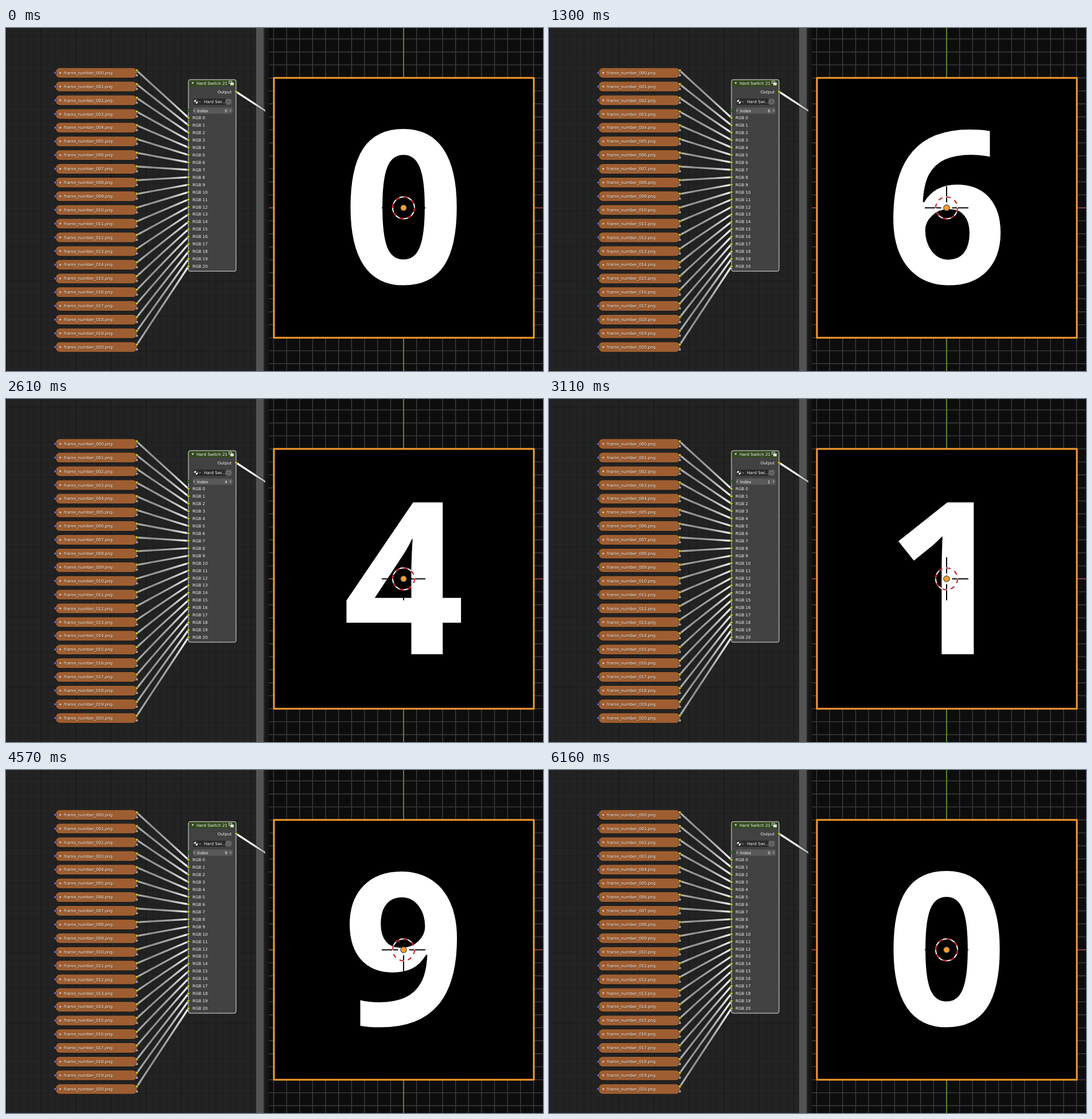
Recreate the animation shown at these times as an HTML page. Size 936 px wide and 598 px high, loop 6.56 s.

```html
<!DOCTYPE html>
<html lang="en">
<head>
<meta charset="utf-8">
<title>Hard Switch</title>
<style>
  html, body { margin: 0; width: 100%; height: 100%; overflow: hidden; background: #0d0d0d; }
  svg { display: block; width: 936px; height: 598px; }
  text { font: 7.1px "DejaVu Sans", sans-serif; fill: #f0f0f0; }
  .end { text-anchor: end; }
  #digit { font: 700 371px "Open Sans", "Noto Sans", sans-serif; fill: #fff; text-anchor: middle; }
</style>
</head>
<body>
<svg viewBox="0 0 936 598">
  <defs>
    <linearGradient id="wire" gradientUnits="userSpaceOnUse" x1="228" y1="0" x2="318" y2="0">
      <stop offset="0" stop-color="#b0b0b0"/>
      <stop offset=".3" stop-color="#8c8c8c"/>
      <stop offset=".65" stop-color="#a8a8a8"/>
      <stop offset="1" stop-color="#f4f4f4"/>
    </linearGradient>
    <linearGradient id="outWire" gradientUnits="userSpaceOnUse" x1="401" y1="0" x2="452" y2="0">
      <stop offset="0" stop-color="#fff"/>
      <stop offset=".6" stop-color="#e8e8e8"/>
      <stop offset="1" stop-color="#a0a0a0"/>
    </linearGradient>
    <clipPath id="editor"><rect width="452" height="598"/></clipPath>
  </defs>

  <!-- node editor -->
  <g clip-path="url(#editor)">
    <rect width="452" height="598" fill="#232323"/>
    <path id="fine" stroke="#1f1f1f"/>
    <path id="coarse" stroke="#1b1b1b" stroke-width="1.2"/>
    <rect x="436" width="13" height="598" fill="#535353"/>
    <g id="wires"></g>
    <g id="images"></g>
    <g id="switch">
      <rect x="318" y="90" width="83" height="334" rx="3" fill="#424242"/>
      <path d="M318 102V93a3 3 0 0 1 3-3h77a3 3 0 0 1 3 3v9z" fill="#344a20"/>
      <rect x="318" y="90" width="83" height="334" rx="3" fill="none" stroke="#e4e4e4"/>
      <path d="M323.5 94.6h4l-2 3.4z" fill="#ddd"/>
      <text x="332" y="98.6">Hard Switch 21</text>
      <g fill="#4a5a3a" stroke="#ddd" stroke-width=".8">
        <rect x="388.5" y="92.5" width="5" height="4"/>
        <rect x="391.5" y="95.5" width="5" height="4" fill="#ddd"/>
      </g>
      <text class="end" x="393.3" y="113.6">Output</text>

      <rect x="326" y="123" width="68" height="11" rx="2.5" fill="#2a2a2a"/>
      <rect x="382" y="123" width="12" height="11" rx="2.5" fill="#545454"/>
      <circle cx="331" cy="128.5" r="3.6" fill="#e4e4e4"/>
      <path d="M331 128.5v-3.6a3.6 3.6 0 0 1 3.6 3.6zv3.6a3.6 3.6 0 0 1-3.6-3.6z" fill="#333"/>
      <path d="M336.6 127.8l1.6 1.6 1.6-1.6" fill="none" stroke="#ccc" stroke-width=".8"/>
      <text x="345" y="131.1">Hard Swi...</text>
      <path d="M385 126q3-.2 3-1 0 .8 3 1v3q-.5 2.500-3 3.300-2.500-.8-3-3.300z" fill="none" stroke="#999" stroke-width=".8"/>

      <rect x="326" y="138.500" width="69" height="11" rx="2.500" fill="#595959"/>
      <path d="M328.700 142l-1.600 2 1.600 2M390.500 142l1.600 2-1.600 2" fill="none" stroke="#ddd" stroke-width=".9"/>
      <text x="333" y="146.600">Index</text>
      <text class="end" id="index" x="385.700" y="146.600">0</text>
      <circle cx="318" cy="143.700" r="2.300" fill="#2d8a2a" stroke="#111" stroke-width=".6"/>
    </g>
  </g>
  <rect x="452" width="6" height="598" fill="#161616"/>

  <!-- viewport -->
  <rect x="458" width="478" height="598" fill="#0d0d0d"/>
  <path id="grid" stroke="#3d3d3d" stroke-width="1.400"/>
  <path d="M458 313.500H936" stroke="#9a4a3a" stroke-width="1.600"/>
  <path d="M693 0V598" stroke="#6a9a28" stroke-width="1.600"/>
  <rect x="467" y="87" width="453" height="453" stroke="#f79b2e" stroke-width="3" stroke-linejoin="round"/>
  <text id="digit" x="693" y="445">0</text>
  <path d="M655 313.500h28.500M702.500 313.500h28.500M693 276v28M693 323v28" stroke="#000" stroke-width="2"/>
  <g fill="none" stroke-width="2">
    <circle cx="693" cy="313.500" r="19" stroke="#fff"/>
    <circle cx="693" cy="313.500" r="19" stroke="#d4101a" pathLength="16" stroke-dasharray="1 1"/>
  </g>
  <circle cx="693" cy="313.500" r="5.200" fill="#ff9f2e" stroke="#4a4a4a" stroke-width="1.200"/>
</svg>
<script>
const $ = id => document.getElementById(id);
const range = n => [...Array(n).keys()];
const dot = (x, y, color) =>
  `<circle cx="${x}" cy="${y}" r="2.4" fill="${color}" stroke="#151515" stroke-width=".6"/>`;

// Horizontal and vertical lines through (cx, cy) that fill a box
function lattice(x0, x1, y1, cx, cy, step) {
  let d = "";
  for (let x = x0 + (cx - x0) % step; x < x1; x += step) d += `M${x} 0V${y1}`;
  for (let y = cy % step; y < y1; y += step) d += `M${x0} ${y}H${x1}`;
  return d;
}
$("fine").setAttribute("d", lattice(0, 436, 598, 61, 441.5, 12.2));
$("coarse").setAttribute("d", lattice(0, 436, 598, 61, 441.5, 61));
$("grid").setAttribute("d", lattice(458, 936, 598, 693, 313.5, 22.65));

const nodeY = i => 78.2 + 23.9 * i;
const rowY = i => 156.6 + 12.945 * i;

function wire(x1, y1, x2, y2, paint) {
  const d = `M${x1} ${y1}L${x2} ${y2}`;
  return `<path d="${d}" stroke="#151515" stroke-opacity=".6" stroke-width="5.5"/>
    <path d="${d}" stroke="url(#${paint})" stroke-width="3.4"/>`;
}

function imageNode(i) {
  const y = nodeY(i), name = `frame_number_${String(i).padStart(3, "0")}.png`;
  return `<rect x="86" y="${y - 9}" width="143" height="18.5" rx="8" fill="#151515"/>
    <rect x="86.5" y="${y - 8.5}" width="142" height="17" rx="7.5" fill="#9e5e31"/>
    <path d="M93.5 ${y - 1.9}v3.8l3.2-1.900z" fill="#e8d8cc"/>
    <text x="101.4" y="${y + 3.4}" style="fill:#000;opacity:.5">${name}</text>
    <text x="101" y="${y + 2.6}">${name}</text>
    ${dot(86, y, "#6363c7")}${dot(228, y + 4.3, "#a1a1a1")}${dot(228, y - 4.3, "#c7c729")}`;
}

$("wires").innerHTML = range(21).map(i => wire(228, nodeY(i) - 4, 318, rowY(i), "wire")).join("")
  + wire(401, 111, 454, 145.5, "outWire");
$("images").innerHTML = range(21).map(imageNode).join("");
$("switch").insertAdjacentHTML("beforeend", dot(401, 111, "#c7c729") + range(21).map(i =>
  `${dot(318, rowY(i), "#c7c729")}<text x="325" y="${rowY(i) + 2.6}">RGB ${i}</text>`).join(""));

// Slider drags: [time in ms, index]
const LOOP = 6560;
const drags = [
  [0, 0], [260, 1], [540, 2], [740, 3], [880, 4], [1020, 5], [1230, 6], [1370, 7], [1510, 8],
  [2120, 7], [2260, 6], [2410, 5], [2550, 4], [2690, 3], [2900, 2], [3110, 1], [3250, 0],
  [3660, 1], [3730, 2], [3870, 3], [3940, 4], [4080, 5], [4220, 6], [4360, 7], [4430, 8],
  [4570, 9], [4780, 10],
  [5740, 9], [5810, 7], [5880, 5], [5950, 3], [6020, 1], [6090, 0]
];

let shown = 0;
function tick() {
  const t = performance.now() % LOOP;
  const value = drags.filter(([at]) => at <= t).pop()[1];
  if (value !== shown) $("index").textContent = $("digit").textContent = shown = value;
  requestAnimationFrame(tick);
}
tick();
</script>
</body>
</html>
```
